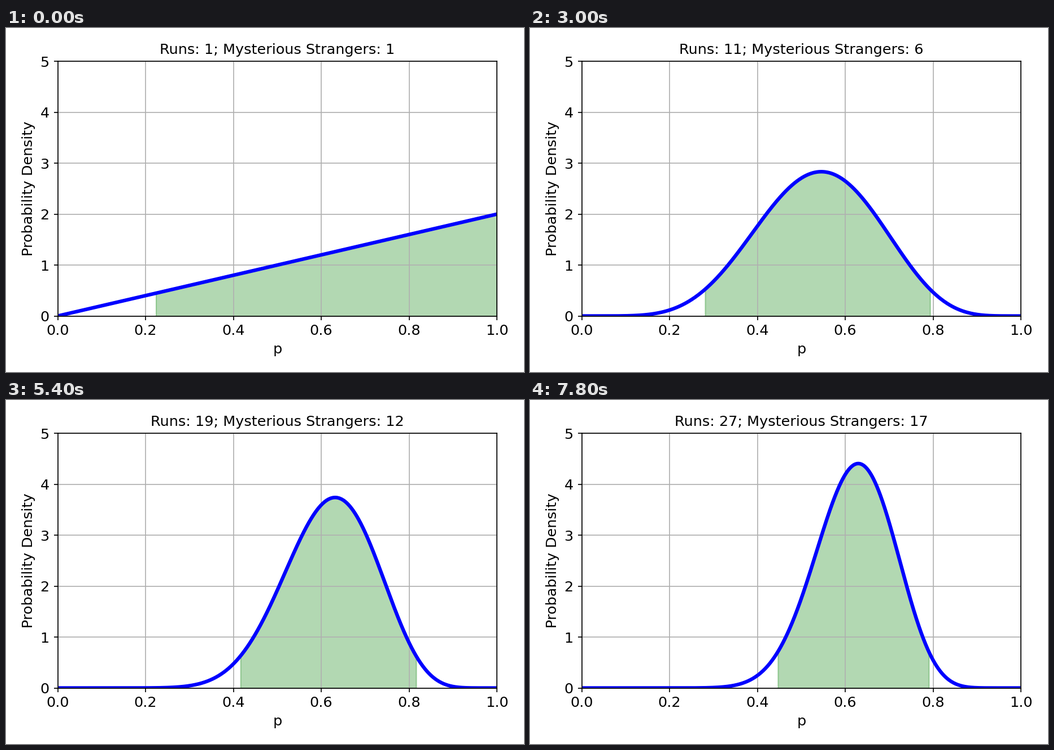
A matplotlib script that plays this animation: 917 by 611 pixels, repeating every 8000 ms.

```python
import math

import matplotlib.pyplot as plt
import numpy as np
from matplotlib.animation import FuncAnimation

WIDTH, HEIGHT = 917, 611
DPI = WIDTH / 6
INTERVAL = 100          # ms per tick
TICKS = 80              # 8000 ms loop
TICKS_PER_RUN = 3
OUTCOMES = [int(c) for c in "101010101011011011110110110"]
MASS = 0.95

plt.rcParams.update({
    "font.family": "DejaVu Sans",
    "font.size": 12,
    "axes.titlesize": 12,
    "axes.labelsize": 12,
})

p = np.linspace(0, 1, 8001)


def posterior(runs, hits):
    """Beta density for a uniform prior."""
    scale = (runs + 1) * math.comb(runs, hits)
    return scale * p**hits * (1 - p)**(runs - hits)


def credible_range(density):
    """Bounding indices of the highest-density interval."""
    order = np.argsort(density)[::-1]
    total = np.cumsum(density[order])
    inside = order[:np.searchsorted(total, MASS * total[-1]) + 1]
    return inside.min(), inside.max()


fig = plt.figure(figsize=(WIDTH / DPI, HEIGHT / DPI), dpi=DPI, facecolor="white")
left, right, top, bottom = 91.5, 869.2, 59.2, 511.5
ax = fig.add_axes([left / WIDTH, 1 - bottom / HEIGHT,
                   (right - left) / WIDTH, (bottom - top) / HEIGHT])
ax.set(xlim=(0, 1), ylim=(0, 5), xlabel="p", ylabel="Probability Density")
ax.grid(True)
title = ax.set_title("")
curve, = ax.plot([], [], color="blue", lw=3)
area = ax.fill_between([0, 1], [0, 0], color="green", alpha=0.3)


def update(tick):
    runs = tick // TICKS_PER_RUN + 1
    hits = sum(OUTCOMES[:runs])
    density = posterior(runs, hits)
    lo, hi = credible_range(density)
    span = np.unique(np.append(np.arange(lo, hi, 16), hi))

    curve.set_data(p[::8], density[::8])
    outline = np.column_stack([p[span], density[span]])
    area.set_verts([np.vstack([[p[lo], 0], outline, [p[hi], 0]])])
    title.set_text(f"Runs: {runs}; Mysterious Strangers: {hits}")
    return curve, area, title


anim = FuncAnimation(fig, update, frames=TICKS, interval=INTERVAL,
                     repeat=True, repeat_delay=0, blit=False)
plt.show()
```
